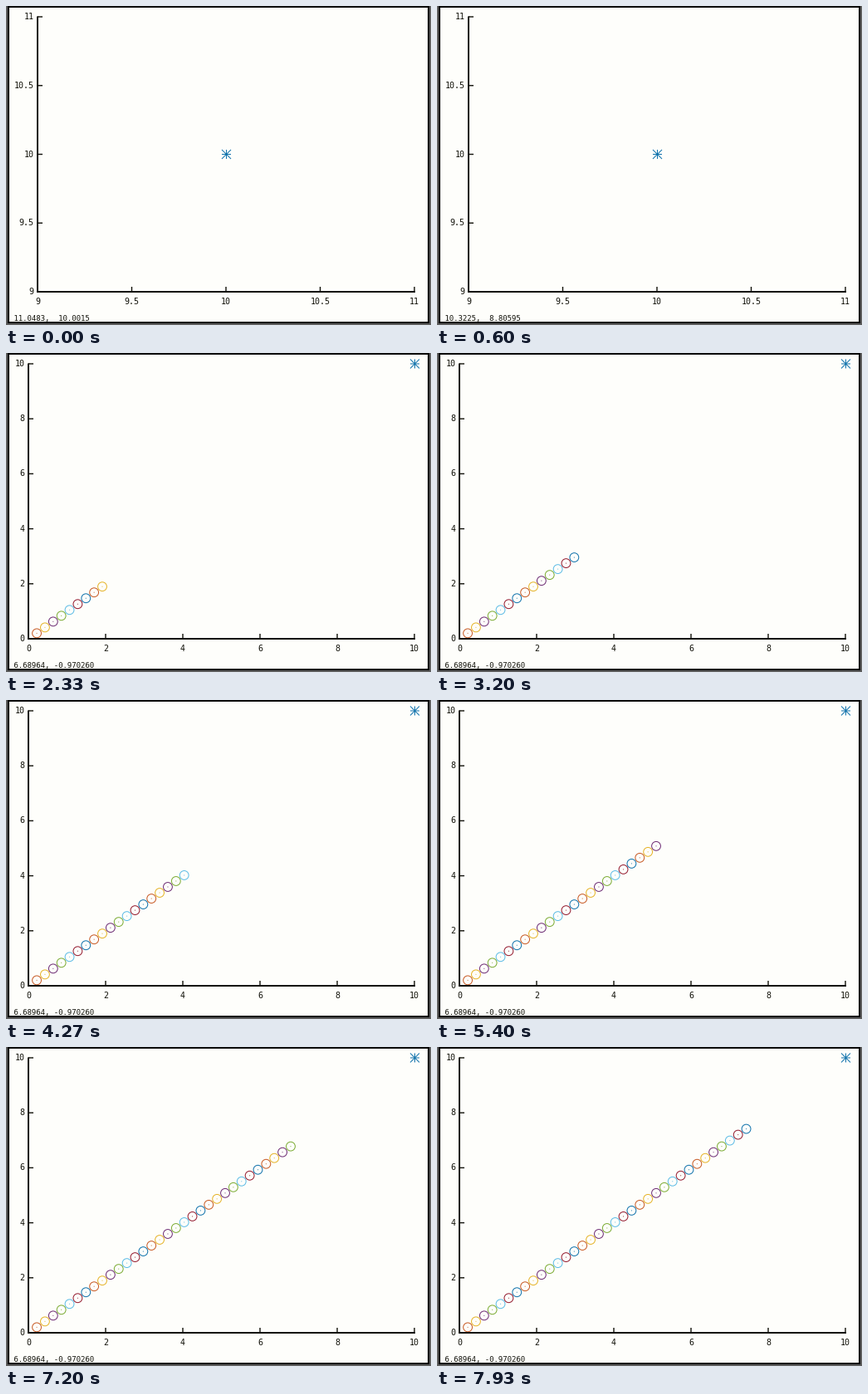
Recreate the animation shown at these times as a matplotlib script. Size 512 by 384 pixels, loop 8000 ms.

```python
import numpy as np
import matplotlib.pyplot as plt
from matplotlib.animation import FuncAnimation
from matplotlib.patches import Circle, Rectangle

W, H, DPI = 512, 384, 64
PT = 72 / DPI                      # points per pixel
LOOP, STEP = 8000, 50
PAPER, INK, FRAME = "#fefefb", "#101008", "#5c5c5c"
CYCLE = ["#0f72ac", "#c85a24", "#e6b428", "#6e2c74", "#7cac34", "#5cbce6", "#941a2e"]

RIGHT, TOP, BASE = 492, 13, 344
SWITCH = 930                       # first circle arrives and the axes rescale
GAP = 0.02122                      # circle spacing as a share of the axis
SHOWN = 35
POINTER_FROM = np.array([11.0483, 10.0015])
POINTER_TO = np.array([10.3225, 8.80595])
POINTER_RESCALED = (6.68964, -0.970260)

fig = plt.figure(figsize=(W / DPI, H / DPI), dpi=DPI, facecolor=PAPER)
ax = fig.add_axes([0, 0, 1, 1])
ax.set_xlim(0, W)
ax.set_ylim(H, 0)
ax.axis("off")


def line(xs, ys, color=INK, width=1.0):
    return ax.plot(xs, ys, color=color, lw=width * PT,
                   solid_capstyle="butt", snap=False)[0]


def label(x, y, text, size=10, **align):
    return ax.text(x, y, text, color=INK, fontsize=size * PT,
                   family="DejaVu Sans Mono", **align)


def box(x, y, w, h, color):
    ax.add_patch(Rectangle((x, y), w, h, fc=color, ec="none"))


def window_edge():
    box(0, 0, 2, H, FRAME)
    box(510, 0, 2, H, FRAME)
    box(0, 382, W, 2, FRAME)
    for x, y, w, h in [(2, 0, 2, 382), (508, 0, 2, 382), (2, 0, 508, 2), (2, 380, 508, 2)]:
        box(x, y, w, h, "black")


def star(x, y, r=5.5):
    c = CYCLE[0]
    return [line([x - r, x + r], [y, y], c), line([x, x], [y - r, y + r], c),
            line([x - r, x + r], [y - r, y + r], c),
            line([x - r, x + r], [y + r, y - r], c)]


def place(left, u):
    """Pixel position of the point a share u along both axes."""
    return left + u * (RIGHT - left), BASE + u * (TOP - BASE)


def view(left, ticks, star_at):
    """Axes with the same ticks on both sides, plus the star marker."""
    lo, hi = ticks[0], ticks[-1]
    parts = [line([left, left], [TOP - 0.5, BASE + 1], width=2),
             line([left - 1, RIGHT + 1], [BASE, BASE], width=2)]
    for v in ticks:
        x, y = place(left, (v - lo) / (hi - lo))
        parts += [line([left, left + 6], [y, y], width=1.4),
                  line([x, x], [BASE, BASE - 6], width=1.4),
                  label(left - 4.5, y, f"{v:g}", ha="right", va="center"),
                  label(x, 356, f"{v:g}", ha="center", va="center")]
    x, y = place(left, (star_at - lo) / (hi - lo))
    return parts + star(x + 0.5, y)


def ring(k):
    x, y = place(27, GAP * k)
    center = (x + 0.2, y + 0.4)
    color = CYCLE[k % len(CYCLE)]
    edge = Circle(center, 5.4, fill=False, ec=color, lw=PT)
    dot = Circle(center, 0.6, fc=color, ec="none", alpha=0.8)
    return [ax.add_patch(edge), ax.add_patch(dot)]


def show(parts, on):
    for p in parts:
        p.set_visible(on)


window_edge()
near = view(38, np.arange(9, 11.1, 0.5), 10)
far = view(27, np.arange(0, 11, 2), 10)
rings = [ring(k) for k in range(1, SHOWN + 1)]
status = label(3.6, 379, "", size=9, va="baseline")


def ring_count(t):
    if t < SWITCH:
        return 0
    return int(np.interp(t, [SWITCH, 3140, 3350, 7750], [1, 14, 15, SHOWN]) + 1e-6)


def pointer(t):
    if t >= SWITCH:
        return POINTER_RESCALED
    u = np.clip((t - 50) / 450, 0, 1)
    u = u * u * (3 - 2 * u)
    return POINTER_FROM + u * (POINTER_TO - POINTER_FROM)


def draw(i):
    t = i * STEP
    show(near, t < SWITCH)
    show(far, t >= SWITCH)
    count = ring_count(t)
    for k, parts in enumerate(rings):
        show(parts, k < count)
    x, y = pointer(t)
    status.set_text(f"{x: #.6g}, {y: #.6g}")
    return [status]


anim = FuncAnimation(fig, draw, frames=LOOP // STEP, interval=STEP,
                     repeat=True, repeat_delay=0, blit=False)
plt.show()
```
